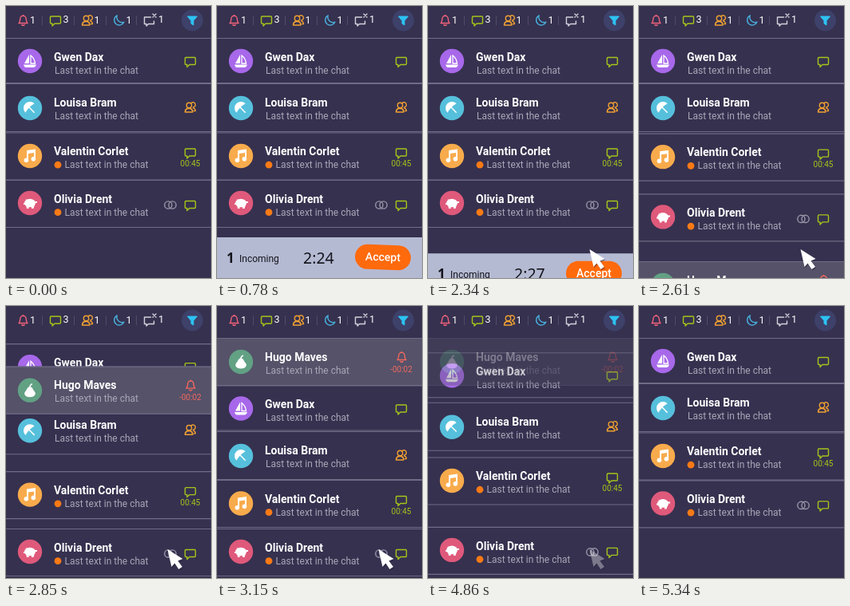
An HTML page that plays this animation: 257x341 px, repeating every 6.3 s.

```html
<!DOCTYPE html>
<html lang="en">
<head>
<meta charset="utf-8">
<title>Incoming chat list</title>
<style>
  html, body { margin: 0; width: 100%; height: 100%; overflow: hidden; background: #36314f; }
  svg { display: block; width: 100%; height: 100%; }
  text { font-family: Roboto, sans-serif; }
  .name { font-size: 14px; font-weight: 700; fill: #fff; }
  .sub { font-size: 12px; fill: #aaa7b8; }
  .time { font-size: 10px; text-anchor: middle; }
  .count { font-size: 12.5px; fill: #fff; }
  .icon { fill: none; stroke: currentColor; stroke-width: 1.4; stroke-linejoin: round; stroke-linecap: round; }
  .lime { color: #a5c51a; fill: #a5c51a; }
  .amber { color: #efa032; }
  .coral { color: #f2685f; fill: #f2685f; }
  .line { stroke: #6f6c86; stroke-width: 1.1; }
  .glyph { fill: #fff; }
  .ink { fill: #15151c; }
</style>
</head>
<body>
<svg viewBox="0 0 257 341">
  <defs>
    <path id="chat" class="icon" d="M-5.5-5H5.5Q6.5-5 6.5-4V3Q6.5 4 5.5 4H-1L-4 7V4H-5.5Q-6.5 4-6.5 3V-4Q-6.5-5-5.5-5Z"/>
    <path id="bell" class="icon" d="M-5.5 3.5C-3.8 2-4-0-3.7-2A3.7 3.7 0 0 1 3.7-2C4 0 3.8 2 5.5 3.5ZM-1.6 5.6Q0 7 1.6 5.6M0-5.7V-6.6"/>
    <g id="people" class="icon">
      <circle cx="-1.5" cy="-2.5" r="3.2"/>
      <path d="M-6.5 6Q-6.5 2.5-3.5 1.5H.2Q3 2.5 3 6ZM1.5-5.6A3.1 3.1 0 1 1 3.5 0M4 1.2Q6.5 2 6.5 4.6H4.5"/>
    </g>
    <path id="moon" class="icon" d="M-2.2-6.2A6.4 6.4 0 1 0 6.4 2.2A6.6 6.6 0 0 1-2.2-6.2Z"/>
    <path id="chat-closed" class="icon" d="M1.5-4H-6.5V4.5H-4V7L-1.5 4.5H5.5V1M4-8L8-4M8-8L4-4"/>
    <g id="rings" class="icon"><circle cx="-2.6" r="4.6"/><circle cx="2.6" r="4.6"/></g>

    <g id="boat" class="glyph">
      <path d="M-1-8V3H-7Z"/>
      <path d="M1-7Q6-3 6.5 3H1Z" fill="none" stroke="#fff" stroke-width="1.3"/>
      <path d="M-8 4.5H8Q6.5 8 4.5 8H-5Q-7 8-8 4.5Z"/>
    </g>
    <g id="umbrella" class="glyph" transform="rotate(-45)">
      <path d="M-8 0A8 8 0 0 1 8 0Q0-2-8 0Z"/>
      <path d="M0-2V8" stroke="#fff" stroke-width="1.5"/>
    </g>
    <g id="notes" class="glyph">
      <path d="M-4-7L7-8.5V4H5V-4L-2-3V6H-4Z"/>
      <circle cx="-4.6" cy="5.2" r="2.8"/><circle cx="4.4" cy="3.8" r="2.8"/>
    </g>
    <g id="pig" class="glyph">
      <ellipse cx="0" cy="0" rx="7" ry="5.3"/>
      <path d="M-6-5L-2-4V0H-8V2H-5L-4 7H-1.5V4H2V7H4.5L6 2ZM6-2H9V0H6Z"/>
    </g>
    <g id="pear" class="glyph">
      <path d="M0-4.5C3.5-4.5 3.5-1 5.5 1C9 5 5 8.5 0 8.5S-9 5-5.5 1C-3.5-1-3.5-4.5 0-4.5Z"/>
      <path d="M0-4Q0-7 3-8" fill="none" stroke="#fff" stroke-width="1.5"/>
    </g>
  </defs>

  <rect width="257" height="341" fill="#36314f"/>
  <g id="header"></g>
  <g id="rows"></g>

  <g id="bar">
    <rect width="257" height="60" fill="#b5bad3"/>
    <text class="ink" x="12" y="32" style="font:600 17px 'Noto Sans',sans-serif">1</text>
    <text class="ink" x="28" y="31" font-size="12">Incoming</text>
    <text class="ink" id="timer" x="108" y="33" style="font:500 19.5px 'Noto Sans',sans-serif"></text>
    <g id="button">
      <rect x="173" y="9.5" width="70" height="31" rx="15.5" fill="#ff6a0c"/>
      <text x="208" y="29.5" font-size="14" font-weight="500" fill="#fff" text-anchor="middle">Accept</text>
    </g>
  </g>

  <g id="cursor">
    <path d="M1 1.5L20 13.5L14 16L19.5 23.5L15 26.5L10 19L6 23.5Z" fill="#1c1930" opacity=".4"/>
    <path d="M0 0L19 12L13 14.5L18.5 22L14 25L9 17.5L5 22Z" fill="#fff"/>
  </g>
</svg>

<script>
const LOOP = 6300;
const $ = id => document.getElementById(id);
const use = (id, x, y, cls = '', extra = '') => `<g class="${cls}" transform="translate(${x} ${y})" ${extra}><use href="#${id}"/></g>`;

// Header counters: icon, x, colour, text x, text y, count
const counters = [
  ['bell', 21.5, '#f4637c', 30, 22, 1], ['chat', 62, '#a5c51a', 71.5, 21.3, 3],
  ['people', 102, '#efa032', 110.5, 22, 1], ['moon', 141.5, '#48add9', 150.5, 22, 1],
  ['chat-closed', 180, '#d3d1dc', 191, 21, 1]
];
$('header').innerHTML = counters.map(([icon, x, color, tx, ty, n]) =>
  use(icon, x, 18, '', `style="color:${color}"`) + `<text class="count" x="${tx}" y="${ty}">${n}</text>`).join('') +
  [45.5, 85.5, 125.5, 163.5].map(x => `<path d="M${x} 12V24" stroke="#504b68"/>`).join('') +
  `<circle cx="233.5" cy="18" r="13.5" fill="#3e416a"/>
   <path d="M227.5 13H239.5L235 18.5V24L232 22V18.5Z" fill="#2cc3f3" stroke="#2cc3f3" stroke-linejoin="round"/>`;

// enter/leave hold the start times of the two shifts
const chats = [
  { name: 'Gwen Dax', glyph: 'boat', color: '#a768ea', top: 40, height: 57, face: 29, shift: 59.5, enter: 2753, leave: 4666,
    status: use('chat', 231, 29.5, 'lime') },
  { name: 'Louisa Bram', glyph: 'umbrella', color: '#56c0dc', top: 97, height: 61, face: 31, shift: 60, enter: 2657, leave: 4702,
    status: use('people', 231, 30, 'amber') },
  { name: 'Valentin Corlet', glyph: 'notes', color: '#f8ab4c', top: 158.5, height: 60, face: 29.5, shift: 59.5, enter: 2572, leave: 4744, unread: true,
    status: use('chat', 231, 25.5, 'lime') + '<text class="time lime" x="231" y="42.5">00:45</text>' },
  { name: 'Olivia Drent', glyph: 'pig', color: '#df597b', top: 218, height: 60, face: 29, shift: 61, enter: 2460, leave: 4854, unread: true,
    status: use('rings', 206, 31.5, '', 'style="color:#9996a8"') + use('chat', 231, 31.5, 'lime') },
  { name: 'Hugo Maves', glyph: 'pear', color: '#62a184', top: 40, height: 60, face: 30, fill: '#555269',
    status: use('bell', 231.5, 24, 'coral') + '<text class="time coral" x="231" y="42.5">-00:02</text>' }
];
$('rows').innerHTML = chats.map(c => `<g>
  <rect width="257" height="${c.height}" fill="${c.fill || 'none'}"/>
  <path class="line" d="M0 .5H257M0 ${c.height - .5}H257"/>
  <circle cx="30" cy="${c.face}" r="15.2" fill="${c.color}"/>${use(c.glyph, 30, c.face)}
  <text class="name" x="60" y="28.8">${c.name}</text>
  ${c.unread ? '<circle cx="65" cy="40.7" r="4.4" fill="#f97a16"/>' : ''}
  <text class="sub" x="${c.unread ? 73.5 : 61}" y="44.8">Last text in the chat</text>
  ${c.status}</g>`).join('');
const rowNodes = [...$('rows').children];

const span = (t, start, duration) => Math.min(1, Math.max(0, (t - start) / duration));
const inOut = u => u < .5 ? 2 * u * u : 1 - 2 * (1 - u) ** 2;
const out = u => 1 - (1 - u) ** 3;
const mix = (a, b, u) => a + (b - a) * u;
const move = (node, x, y) => node.setAttribute('transform', `translate(${x} ${y})`);

function draw(t) {
  const fade = 1 - out(span(t, 4640, 750));

  chats.forEach((c, i) => {
    if (c.shift) {
      const shifted = inOut(span(t, c.enter, 400)) - out(span(t, c.leave, 600));
      move(rowNodes[i], 0, c.top + c.shift * shifted);
    } else {
      move(rowNodes[i], 0, mix(342, c.top, inOut(span(t, 2530, 424))));
      rowNodes[i].setAttribute('opacity', fade);
    }
  });

  const raised = inOut(span(t, 10, 650)) - span(t, 1850, 650) ** 3.3;
  move($('bar'), 0, 341 - 51 * raised);
  $('timer').textContent = '2:2' + (t < 1200 ? 4 : t < 1530 ? 5 : t < 1830 ? 6 : 7);

  const wobble = span(t, 675, 225);
  $('button').setAttribute('transform', `rotate(${-2 * Math.sin(3 * Math.PI * wobble)} 208 25)`);

  const travel = inOut(span(t, 1180, 650));
  move($('cursor'), mix(33, 202.5, travel), mix(127, 305, travel));
  $('cursor').setAttribute('opacity', span(t, 1180, 250) * fade);
}

function tick() {
  draw(performance.now() % LOOP);
  requestAnimationFrame(tick);
}
tick();
</script>
</body>
</html>
```
